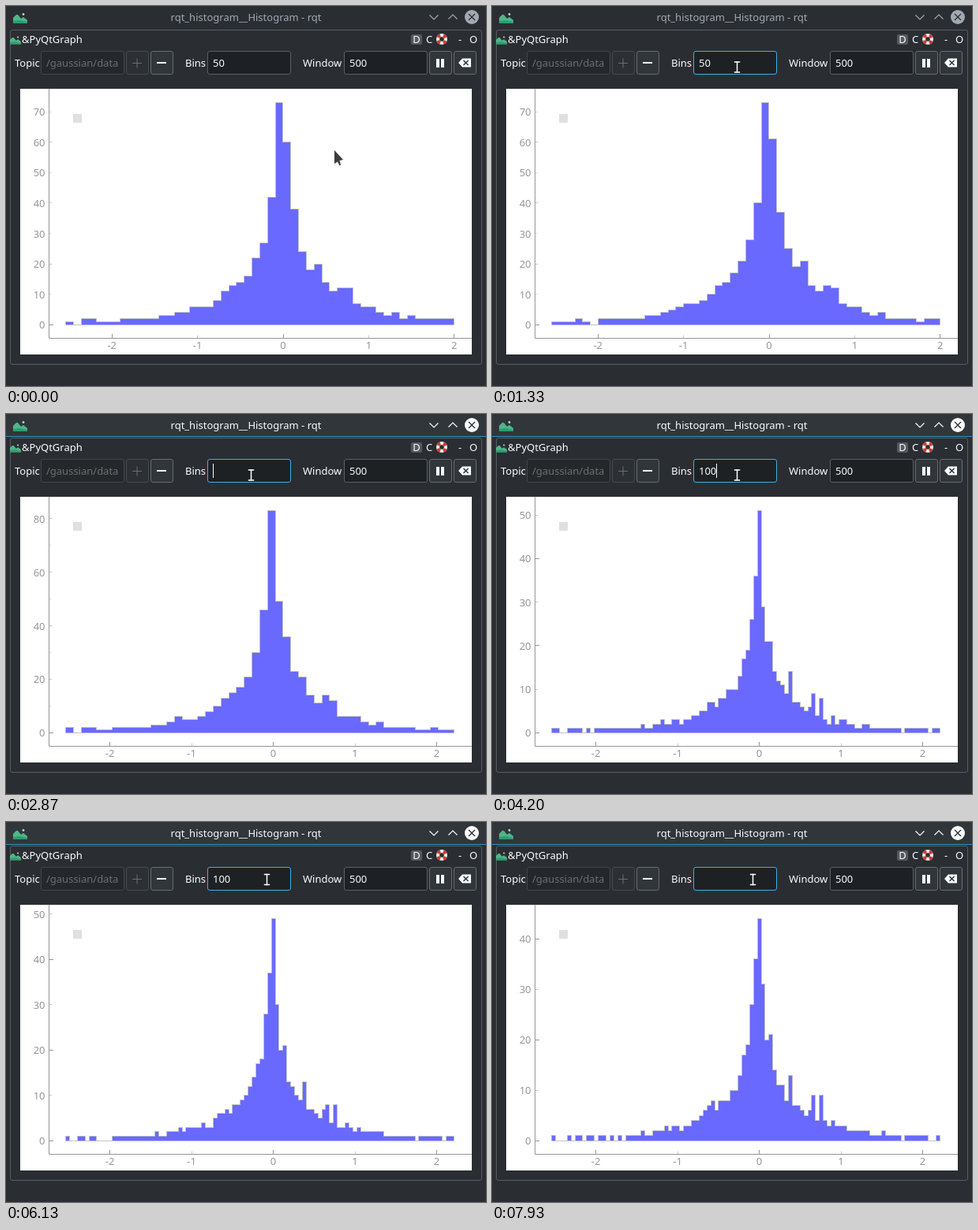
Animation, 608 px wide and 482 px high, one loop 8 s. Source, as an HTML page with a canvas:

```html
<!DOCTYPE html>
<html lang="en">
<head>
<meta charset="utf-8">
<title>Histogram</title>
<style>
html, body { margin: 0; width: 100%; height: 100%; overflow: hidden; background: #2a2e32; }
canvas { display: block; }
</style>
</head>
<body>
<canvas id="stage" width="608" height="482"></canvas>
<script>
const ctx = document.getElementById('stage').getContext('2d');
const LOOP = 8000, STEP = 200 / 3;
const BODY = '#2a2e32', FIELD = '#1e2124', BUTTON = '#31363b', EDGE = '#5c6064';
const WHITE = '#fcfcfc', BLUE = '#3daee9', GREY = '#969696';
const FONT = '13px "Noto Sans", sans-serif';
const LEFT = 75.6, SPAN = 491.6, BASE = 404.3, RISE = 281.7;

// Horizontal axis: pixel of zero and pixels per unit.
const narrow = { zero: 351, unit: 108.4 }, wide = { zero: 338.5, unit: 103.5 };
const WIDEN = 2100, REBIN = 3250;

// Height of the tallest bar over time, for 50 and for 100 bins.
const peaks50 = [[0, 73], [1330, 73], [2870, 83]];
const peaks100 = [[REBIN, 53], [4200, 51], [4930, 49], [6130, 49], [7930, 44]];

// Values around which samples bunch up.
const clusters = [0.15, 0.39, 0.67, 0.76];
const CELL = 0.0475, MODE = -0.015;

const clamp = v => Math.max(0, Math.min(1, v));
const mix = (a, b, p) => a + (b - a) * p;
const ease = u => u * u * (3 - 2 * u);

function random(a, b = 0) {
  const s = Math.sin(a * 127.1 + b * 311.7 + 5.3) * 43758.5453;
  return s - Math.floor(s);
}

function along(points, t) {
  const i = points.findIndex(p => p[0] > t);
  if (i < 0) return points[points.length - 1][1];
  const [t0, a] = points[i - 1], [t1, b] = points[i];
  return mix(a, b, (t - t0) / (t1 - t0));
}

// Mean count in one narrow bin: a sharp peak on a broad base.
function mean(v) {
  const d = Math.abs(v - MODE);
  const bunch = clusters.some(c => Math.abs(v - c) < CELL / 2) ? 4.5 : 0;
  return 28 * Math.exp(-d / 0.08) + 18 * Math.exp(-d / 0.5) + 0.25 + bunch;
}

// Scatter that is mostly fixed per value and drifts slowly as the window slides.
function scatter(v, t) {
  const cell = Math.round(v / CELL), age = t / 1000, e = Math.floor(age);
  const drift = mix(random(cell, e + 1), random(cell, e + 2), age - e);
  return mix(random(cell), drift, 0.4) - 0.5;
}

function heights(n, axis, t) {
  const parts = 100 / n, means = [], counts = [];
  for (let i = 0; i < n; i++) {
    let m = 0, c = 0;
    for (let j = 0; j < parts; j++) {
      const v = (LEFT + (i * parts + j + 0.5) * SPAN / 100 - axis.zero) / axis.unit;
      const part = mean(v);
      m += part;
      c += Math.max(0, Math.round(part + 1.3 * Math.sqrt(part) * scatter(v, t)));
    }
    means.push(m);
    counts.push(c);
  }
  counts[0] = counts[0] || 1;
  counts[n - 1] = counts[n - 1] || 1;
  const top = means.indexOf(Math.max(...means));
  const peak = Math.round(along(n === 50 ? peaks50 : peaks100, t));
  return counts.map((c, i) => i === top ? peak : Math.min(c, peak));
}

function text(s, x, y, color, align = 'left') {
  ctx.font = FONT;
  ctx.textAlign = align;
  ctx.fillStyle = color;
  ctx.fillText(s, x, y);
}
function rect(x, y, w, h, color) {
  ctx.fillStyle = color;
  ctx.fillRect(x, y, w, h);
}
function box(x, y, w, h, fill, edge) {
  ctx.beginPath();
  ctx.roundRect(x + 0.5, y + 0.5, w - 1, h - 1, 2.5);
  if (fill) { ctx.fillStyle = fill; ctx.fill(); }
  ctx.lineWidth = 1;
  ctx.strokeStyle = edge;
  ctx.stroke();
}
function line(points, color, width = 1) {
  ctx.beginPath();
  points.forEach(([x, y]) => ctx.lineTo(x, y));
  ctx.lineWidth = width;
  ctx.strokeStyle = color;
  ctx.stroke();
}
function shape(points, color) {
  ctx.beginPath();
  points.forEach(([x, y]) => ctx.lineTo(x, y));
  ctx.closePath();
  ctx.fillStyle = color;
  ctx.fill();
}
function disc(x, y, r, color) {
  ctx.beginPath();
  ctx.arc(x, y, r, 0, Math.PI * 2);
  ctx.fillStyle = color;
  ctx.fill();
}

function landscape(x, y, s) {
  const at = (u, v) => [x + u * s, y + v * s];
  shape([at(0, 16), at(0, 9), at(4, 5), at(6, 5), at(10, 10), at(13, 8), at(18, 12), at(18, 16)], '#4fb58a');
  shape([at(0, 16), at(0, 13), at(8, 12), at(18, 14), at(18, 16)], '#2f9c70');
  disc(...at(13, 4.5), 1.4 * s, '#c9ced2');
}

function titleBar(active) {
  const ink = active ? WHITE : '#a1a9b1';
  rect(0, 0, 608, 28, active ? '#31363b' : BODY);
  if (active) rect(0, 28, 608, 1, '#3590bf');
  landscape(9, 6, 1);
  text('rqt_histogram__Histogram - rqt', 304, 19, ink, 'center');
  line([[536.5, 11.5], [542, 17], [547.5, 11.5]], ink, 1.2);
  line([[560.5, 16.5], [566, 11], [571.5, 16.5]], ink, 1.2);
  disc(590, 14, 9, ink);
  line([[586, 10], [594, 18]], BODY, 1.3);
  line([[594, 10], [586, 18]], BODY, 1.3);
}

function dock() {
  box(5, 30, 598, 425, null, '#5a5e62');
  landscape(5, 36, 0.78);
  text('&PyQtGraph', 20, 47, WHITE);
  ctx.beginPath();
  ctx.roundRect(513, 36, 14, 13, 2);
  ctx.fillStyle = '#54595d';
  ctx.fill();
  text('D', 520, 47, WHITE, 'center');
  text('C', 532, 47, WHITE);
  disc(552, 42, 7, '#eeeeee');
  ctx.lineWidth = 4;
  ctx.strokeStyle = '#d8392f';
  for (let q = 0; q < 4; q++) {
    ctx.beginPath();
    ctx.arc(552, 42, 5, q * Math.PI / 2 + 0.4, q * Math.PI / 2 + 1.2);
    ctx.stroke();
  }
  disc(552, 42, 2.8, BODY);
  text('-', 573, 47, WHITE);
  text('O', 587, 47, WHITE);
}

function toolbar(focused, value, caret) {
  const dim = '#6b6f72', rim = '#686c70';
  text('Topic', 11, 77, WHITE);
  box(44, 57, 106, 30, '#24282b', '#43474b');
  text('/gaussian/data', 51, 77, dim);
  box(152, 57, 29, 30, '#2c3034', '#484c50');
  rect(160, 72, 12, 1, dim);
  rect(165.5, 66.5, 1, 12, dim);
  box(183, 57, 29, 30, BUTTON, rim);
  rect(191, 71, 12, 2, WHITE);
  text('Bins', 227, 77, WHITE);
  box(255, 57, 106, 30, FIELD, focused ? BLUE : EDGE);
  text(value, 262, 77, WHITE);
  if (caret) rect(Math.round(262 + ctx.measureText(value).width), 63, 1, 18, WHITE);
  text('Window', 376, 77, WHITE);
  box(428, 57, 106, 30, FIELD, EDGE);
  text('500', 435, 77, WHITE);
  box(536, 57, 29, 30, BUTTON, rim);
  rect(545, 67, 4, 11, WHITE);
  rect(551, 67, 4, 11, WHITE);
  box(567, 57, 29, 30, BUTTON, rim);
  shape([[573, 72], [578, 66.5], [589, 66.5], [589, 77.5], [578, 77.5]], WHITE);
  line([[579.5, 69], [585.5, 75]], BUTTON, 1.6);
  line([[585.5, 69], [579.5, 75]], BUTTON, 1.6);
}

const shade = level => `rgba(150,150,150,${1 / (level + 1)})`;
const tickSize = level => 5 / (1 + level / 2);
const snap = v => Math.floor(v) + 0.5;

function plot(h, axis) {
  const max = Math.max(...h), s = RISE / max, w = SPAN / h.length;
  rect(18, 105, 572, 337, '#ffffff');
  rect(85, 137, 11, 11, '#e0e0e0');

  const outline = [[snap(LEFT), snap(BASE)]];
  h.forEach((v, i) => {
    const y = snap(BASE - v * s);
    outline.push([snap(LEFT + i * w), y], [snap(LEFT + (i + 1) * w), y]);
  });
  outline.push([snap(LEFT + SPAN), snap(BASE)]);
  shape(outline, '#6969ff');
  line(outline, '#c2c2c8');

  line([[54.5, 105], [54.5, 421.5], [590, 421.5]], GREY);
  const coarse = max > 51;
  const top = (BASE - 105) / s, every = max < 75.3 ? 10 : 20;
  for (let v = 0; v <= top; v += 10) {
    const y = BASE - v * s, even = v % 20 === 0;
    const level = coarse ? (v % 100 === 0 ? 0 : even ? 1 : 2) : (even ? 0 : 1);
    line([[55, snap(y)], [55 + tickSize(level), snap(y)]], shade(level));
    if (v % every === 0 && y > 111) text(v, 49.5, Math.round(y) + 5, GREY, 'right');
  }
  for (let v = -2; v <= 2; v++) {
    const x = axis.zero + v * axis.unit, level = v % 2 ? 1 : 0;
    line([[snap(x), 421], [snap(x), 421 - tickSize(level)]], shade(level));
    text(v, x, 435, GREY, 'center');
  }
}

function pointer(t) {
  const enter = ease(clamp((t - 800) / 400)), nudge = ease(clamp((t - 5460) / 540));
  const x = mix(416, 310.5, enter) + 20 * nudge;
  const y = mix(183, 77.5, enter) - 4.5 * nudge;
  ctx.save();
  ctx.translate(x, y);
  if (x < 361 && y < 88) {
    const beam = [[[-3, -6.5], [3, -6.5]], [[0, -6.5], [0, 6.5]], [[-3, 6.5], [3, 6.5]]];
    ctx.lineCap = 'square';
    beam.forEach(b => line(b, '#101214', 3.2));
    beam.forEach(b => line(b, WHITE, 1.6));
  } else {
    const arrow = [[0, 0], [0, 17], [4, 14.5], [6.5, 19.5], [8, 18.5], [6.5, 13], [11, 12], [0, 0]];
    line(arrow, '#f4f4f4', 2);
    shape(arrow, '#3a3e42');
  }
  ctx.restore();
}

// Edits of the Bins field; each restarts the caret blink.
const edits = [[0, '50'], [1400, '50'], [2400, ''], [2950, '1'], [3050, '10'], [3150, '100'], [7400, '']];

// Time of the last repaint, with the two short stalls of the recording.
function repaint(t) {
  const q = Math.floor((t + 5) / STEP) * STEP;
  if (q > 801 && q < 999) return 800;
  return q > 7001 && q < 7130 ? 7000 : q;
}

function draw(now) {
  const t = now % LOOP, q = repaint(t);
  const [since, value] = edits.filter(e => e[0] <= t).pop();
  const caret = t >= 1400 && (t - since) % 1000 < 500;
  rect(0, 0, 608, 482, BODY);
  titleBar(t >= 1460);
  dock();
  toolbar(t >= 1260, value, caret);
  const axis = q < WIDEN ? narrow : wide;
  plot(heights(q < REBIN ? 50 : 100, axis, q), axis);
  pointer(q);
}

const start = performance.now();
function tick() {
  draw(performance.now() - start);
  requestAnimationFrame(tick);
}
tick();
</script>
</body>
</html>
```
